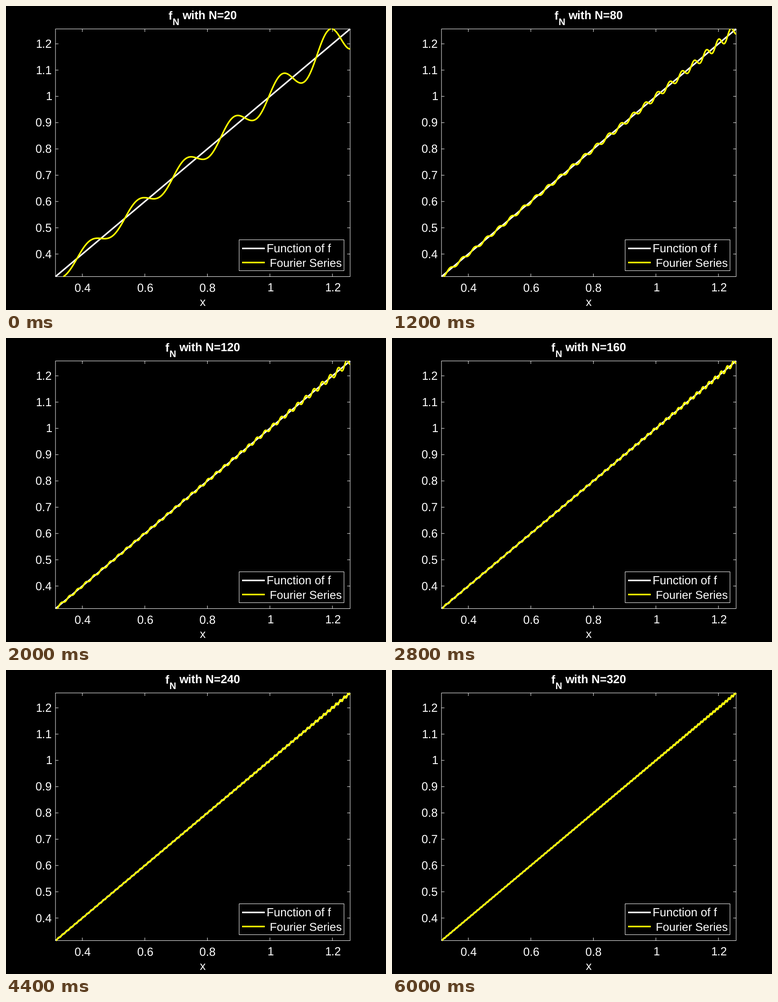
A matplotlib script for the animation above (6400 ms loop, 837 px wide and 669 px high).

```python
import numpy as np
import matplotlib
import matplotlib.pyplot as plt
from matplotlib.animation import FuncAnimation
from matplotlib.patches import Rectangle

matplotlib.rcParams.update({
    "font.family": "Liberation Sans",
    "text.hinting": "none",
    "path.simplify": False,
    "path.snap": False,
    "toolbar": "None",
})

W, H, DPI = 837, 669, 64
PT = 72 / DPI  # points per pixel
LEFT, RIGHT, TOP, BOTTOM = 109, 758, 50.5, 595.5
LO, HI = 0.1 * np.pi, 0.4 * np.pi
FONT, LINE = 25.6, 3.4
STEP, FRAMES = 20, 16

fig = plt.figure(figsize=(W / DPI, H / DPI), dpi=DPI, facecolor="black")
ax = fig.add_axes([0, 0, 1, 1])
ax.set(xlim=(0, W), ylim=(H, 0))
ax.axis("off")


def to_px(x):
    return LEFT + (x - LO) / (HI - LO) * (RIGHT - LEFT)


def to_py(y):
    return BOTTOM - (y - LO) / (HI - LO) * (BOTTOM - TOP)


def label(x, base, s, size=FONT, **kw):
    return ax.text(x, base, s, fontsize=size * PT, color="white",
                   ha="left", va="baseline", **kw)


def stroke(xs, ys, color="white", width=1, z=2):
    line, = ax.plot(xs, ys, color=color, lw=width * PT, zorder=z,
                    solid_capstyle="butt", solid_joinstyle="round")
    return line


def frame_box(x0, y0, x1, y1, z):
    ax.add_patch(Rectangle((x0, y0), x1 - x0, y1 - y0, facecolor="black",
                           edgecolor="white", lw=PT, zorder=z))


def number_width(s):
    return FONT * sum(0.278 if c == "." else 0.556 for c in s)


def draw_axes():
    frame_box(LEFT, TOP, RIGHT, BOTTOM, 1)
    tick = 6.5
    for v in np.arange(4, 13, 2) / 10:
        x, s = to_px(v), f"{v:g}"
        stroke([x, x], [BOTTOM, BOTTOM - tick])
        stroke([x, x], [TOP, TOP + tick])
        label(x - number_width(s) / 2 + 0.5, 628.5, s)
    for v in np.arange(4, 13) / 10:
        y, s = to_py(v), f"{v:g}"
        stroke([LEFT, LEFT + tick], [y, y])
        stroke([RIGHT, RIGHT - tick], [y, y])
        label(101 - number_width(s), y + 8.5, s)
    label(426.9, 660, "x")


def draw_legend():
    frame_box(513.5, 514.5, 744.5, 582.5, 5)
    stroke([520, 570], [533.5, 533.5], "white", LINE, 6)
    stroke([520, 570], [564.5, 564.5], "yellow", LINE, 6)
    label(574.5, 543, "Function of f", 25.7, zorder=6)
    label(581, 574, "Fourier Series", 25.2, zorder=6)


draw_axes()
draw_legend()
stroke([LEFT, RIGHT], [BOTTOM, TOP], "white", LINE, 3)

# Partial sums of the series for f(x) = x with period pi
x = np.linspace(LO, HI, 3000)
orders = np.arange(1, STEP * FRAMES + 1)
terms = (-1.0) ** (orders + 1) / orders * np.sin(2 * np.outer(x, orders))
sums = np.cumsum(terms, axis=1)

curve = stroke(to_px(x), to_py(x), "yellow", LINE, 4)
title_f = label(0, 30, "f", weight="bold")
title_sub = label(0, 42, "N", 20.5, weight="bold")
title_rest = label(0, 30, "", weight="bold")


def update(i):
    n = STEP * (i + 1)
    y = sums[:, n - 1]
    inside = (y >= LO) & (y <= HI)
    curve.set_ydata(np.where(inside, to_py(y), np.nan))

    start = 357.9 - 7.1 * (len(str(n)) - 2)
    title_f.set_x(start)
    title_sub.set_x(start + 8.5)
    title_rest.set_x(start + 30.6)
    title_rest.set_text(f"with N={n}")
    return curve, title_f, title_sub, title_rest


anim = FuncAnimation(fig, update, frames=FRAMES, interval=400,
                     repeat=True, repeat_delay=0, blit=False)
plt.show()
```
